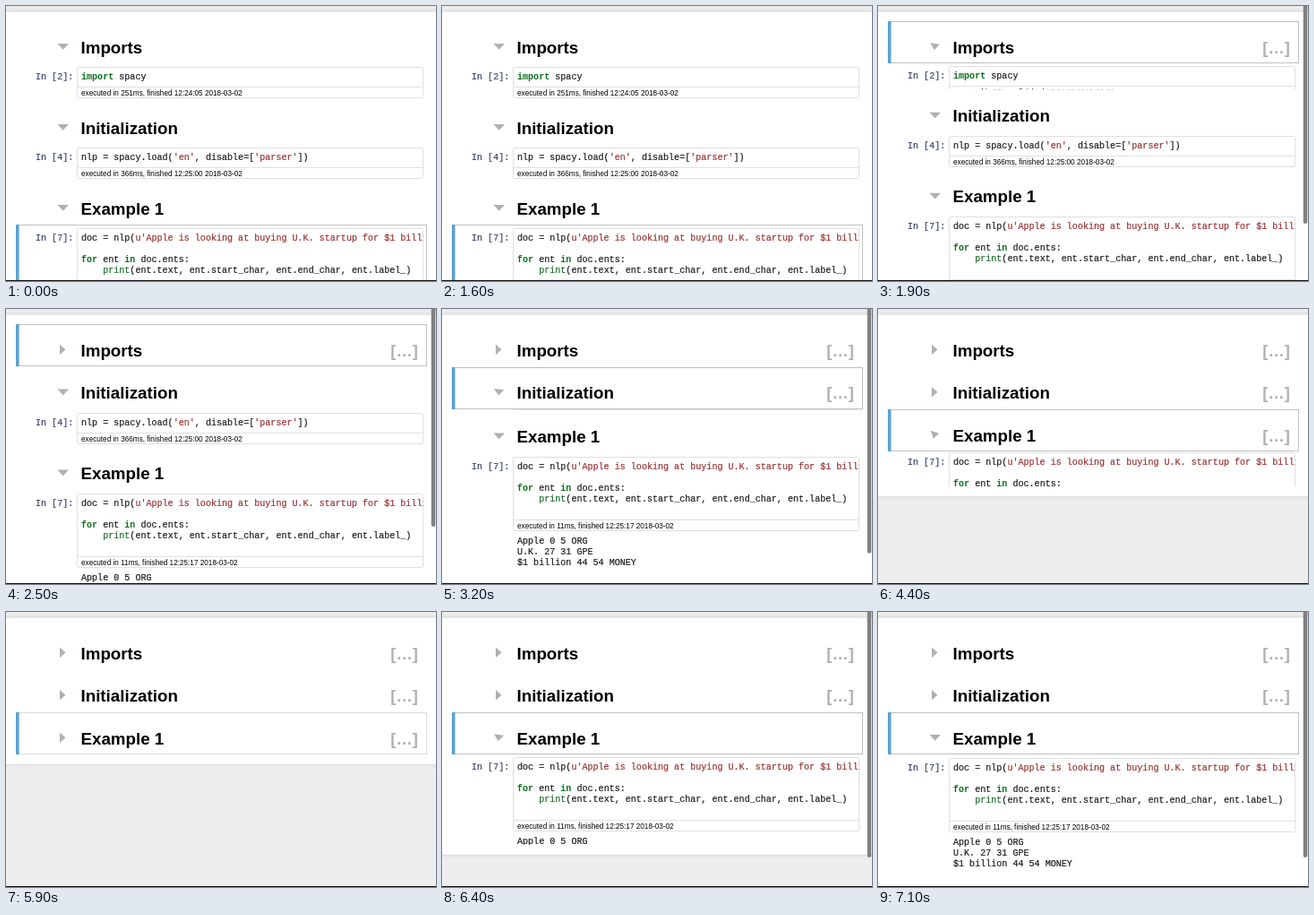
An HTML page that plays this animation: 480x307 px, repeating every 7300 ms.

```html
<!DOCTYPE html>
<html lang="en">
<head>
<meta charset="utf-8">
<title>Collapsible notebook headings</title>
<style>
  html, body { margin: 0; height: 100%; overflow: hidden; background: #eee; }
  #stage { display: block; width: 100vw; height: 100vh; }
  text { white-space: pre; fill: #1c1c1c; font: 10.07px "Liberation Mono", monospace; }
  .code { stroke: #1c1c1c; stroke-width: .2px; }
  .title, .dots { font: bold 18.75px "Liberation Sans", sans-serif; fill: #000; }
  .dots { font-size: 18.3px; fill: #b0b0b0; }
  .note { font: 8.2px "Liberation Sans", sans-serif; fill: #000; }
  .prompt { fill: #3a4066; stroke: #3a4066; }
  .key { font-weight: bold; fill: #0a701c; stroke: none; }
  .call { fill: #1d6b2a; stroke: #1d6b2a; }
  .str { fill: #983232; stroke: #983232; }
  .frame { fill: #fff; stroke: #e0e0e0; }
  .arrow { fill: #b0b0b0; }
  #page { fill: #fff; filter: drop-shadow(0 0 2px rgba(87, 87, 87, .25)); }
</style>
</head>
<body>
<svg id="stage" viewBox="0 0 480 307">
  <rect id="page" x="-10" y="6.5" width="500"/>
  <g id="sections"></g>
  <g id="selection">
    <rect id="outline" x="11.5" y=".5" width="458" fill="none"/>
    <rect id="marker" x="11" width="3.6" fill="#5ba3d3"/>
  </g>
  <rect id="scrollbar" x="474.7" y="-4" width="4.6" rx="2.3" fill="#808080"/>
  <rect y="306" width="480" height="1" fill="#111"/>
</svg>
<script>
const LOOP = 7300, HEADER = 47.5, LINE = 12;
const $ = id => document.getElementById(id);
const key = s => `<tspan class="key">${s}</tspan>`;
const call = s => `<tspan class="call">${s}</tspan>`;
const str = s => `<tspan class="str">${s}</tspan>`;

const ramp = (t, start, duration = 400) => Math.min(1, Math.max(0, (t - start) / duration));
const swing = p => 0.5 - Math.cos(p * Math.PI) / 2;
const slide = (t, start) => swing(ramp(t, start));

// codeHeight is the distance from the top of the code box to the divider.
const sections = [
  {
    title: 'Imports', prompt: 2, height: 42.5, codeHeight: 22,
    code: [`${key('import')} spacy`],
    note: 'executed in 251ms, finished 12:24:05 2018-03-02', output: [],
    open: t => 1 - slide(t, 1750),
    arrow: t => ramp(t, 1800),
    dots: t => t >= 1750
  },
  {
    title: 'Initialization', prompt: 4, height: 42.5, codeHeight: 22,
    code: [`nlp = spacy.load(${str("'en'")}, disable=[${str("'parser'")}])`],
    note: 'executed in 366ms, finished 12:25:00 2018-03-02', output: [],
    open: t => 1 - slide(t, 2850),
    arrow: t => ramp(t, 3150, 300),
    dots: t => t >= 2550
  },
  {
    title: 'Example 1', prompt: 7, height: 145, codeHeight: 70,
    code: [
      `doc = nlp(${str("u'Apple is looking at buying U.K. startup for $1 billion'")})`,
      '',
      `${key('for')} ent ${key('in')} doc.ents:`,
      `    ${call('print')}(ent.text, ent.start_char, ent.end_char, ent.label_)`
    ],
    note: 'executed in 11ms, finished 12:25:17 2018-03-02',
    output: ['Apple 0 5 ORG', 'U.K. 27 31 GPE', '$1 billion 44 54 MONEY'],
    open: t => 1 - slide(t, 4140) + slide(t, 6150),
    arrow: t => ramp(t, 4250, 300) - ramp(t, 6180, 300),
    dots: t => t >= 4100 && t < 6150
  }
];

const textLines = (lines, x, y, pitch) =>
  lines.map((s, i) => `<text class="code" x="${x}" y="${y + i * pitch}">${s}</text>`).join('');

function sectionMarkup(s) {
  const divider = 4.5 + s.codeHeight, bottom = divider + 12;
  return `<g class="header">
      <polygon class="arrow"/>
      <text class="title" x="83.5" y="6.5">${s.title}</text>
      <text class="dots" x="429.3" y="6.5">[…]</text>
    </g>
    <svg class="body" width="480"><g class="content">
      <text class="code prompt" x="33" y="18.3">In [${s.prompt}]:</text>
      <rect class="frame" x="79.5" y="4.5" width="386" height="${bottom - 4.5}" rx="1"/>
      <path class="frame" d="M80 ${divider}H465"/>
      <svg width="465.5" height="${divider}">${textLines(s.code, 84, 18.3, LINE)}</svg>
      <text class="note" x="84" y="${divider + 9.3}">${s.note}</text>
      ${textLines(s.output, 84, bottom + 14, 12.2)}
    </g></svg>`;
}

for (const s of sections) {
  const group = document.createElementNS('http://www.w3.org/2000/svg', 'g');
  group.innerHTML = sectionMarkup(s);
  $('sections').append(group);
  for (const name of ['header', 'arrow', 'dots', 'body', 'content'])
    s[name + 'El'] = group.querySelector('.' + name);
}

const ARROW_DOWN = [57.5, -4, 70, -4, 63.7, 2.7];
const ARROW_RIGHT = [60, -6.5, 66.5, -0.7, 60, 5];

function select(top, height, t) {
  $('selection').setAttribute('transform', `translate(0 ${Math.round(top)})`);
  $('outline').setAttribute('height', height - 1);
  $('outline').setAttribute('stroke', t >= 5000 && t < 6150 ? '#dcdcdc' : '#c0c0c0');
  $('marker').setAttribute('height', height);
}

function draw(t) {
  let y = 46;
  for (const s of sections) {
    const open = s.open(t), turn = s.arrow(t);
    s.y = y;
    s.headerEl.setAttribute('transform', `translate(0 ${y})`);
    s.arrowEl.setAttribute('points', ARROW_DOWN.map((v, i) => v + (ARROW_RIGHT[i] - v) * turn).join(' '));
    s.dotsEl.style.display = s.dots(t) ? '' : 'none';
    s.bodyEl.setAttribute('y', Math.round(y + 18));
    s.bodyEl.setAttribute('height', s.height * open);
    s.contentEl.setAttribute('transform', `translate(0 ${Math.round(-4 * (1 - open))})`);
    y += HEADER + s.height * open;
  }
  $('page').setAttribute('height', y - HEADER + 29 - 6.5);

  const [imports, init, example] = sections;
  if (t < 1750) select(example.y + 18, example.height, t);
  else select((t < 2550 ? imports : t < 4100 ? init : example).y - 29, 47, t);

  const barVisible = t >= 1780 && t < 4200 || t >= 6350;
  $('scrollbar').style.display = barVisible ? '' : 'none';
  $('scrollbar').setAttribute('height', 247 + 31 * (1 - init.open(t)));
}

const start = performance.now();
function tick() {
  draw((performance.now() - start) % LOOP);
  requestAnimationFrame(tick);
}
tick();
</script>
</body>
</html>
```
